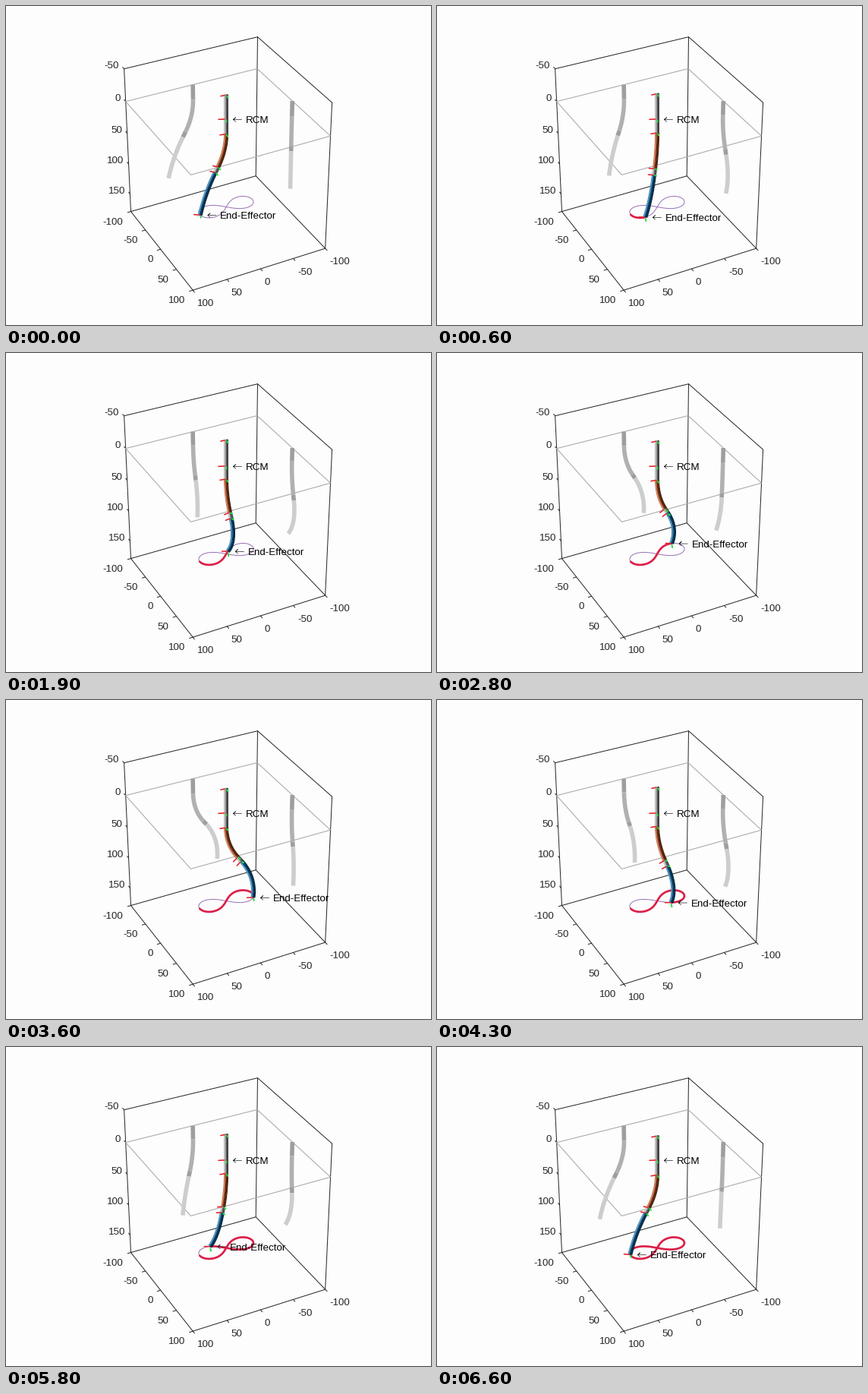
Recreate the animation shown at these times as a matplotlib script. Size 560 by 420 pixels, loop 6700 ms.

```python
import numpy as np
import matplotlib.pyplot as plt
from matplotlib.animation import FuncAnimation

W, H, DPI = 560, 420, 100
FRAMES, STEP = 67, 100
PX = 72 / DPI
ZTOP, ZBOT, ZTIP = -50, 180, 141.7
SIZE = 40.4  # half length of the figure eight
LEAD = 0.3   # phase lead of the arm, in steps
DOWN = np.array([0.0, 0.0, 1.0])

INK = "#262626"
GREY, ORANGE, BLUE = (0.8, 0.8, 0.8), (0.85, 0.33, 0.1), (0.0, 0.447, 0.741)

plt.rcParams["font.family"] = "Liberation Sans"
fig = plt.figure(figsize=(W / DPI, H / DPI), dpi=DPI, facecolor="#fdfdfd")
ax = fig.add_axes([0, 0, 1, 1])
ax.set_xlim(0, W)
ax.set_ylim(H, 0)
ax.axis("off")


def fit_camera():
    """Perspective camera fitted to the visible corners of the box."""
    corners = [
        (-100, 100, ZTOP, 155.5, 82.5), (-100, -100, ZTOP, 331.5, 41),
        (100, -100, ZTOP, 429.5, 126.5),
        (-100, 100, 0, 157.5, 126), (-100, -100, 0, 331, 82.5),
        (100, -100, 0, 427.5, 171.5), (100, 100, 0, 244, 222.5),
        (-100, 100, ZBOT, 164.5, 270.5), (-100, -100, ZBOT, 329.5, 223.5),
        (100, -100, ZBOT, 420.5, 319.5), (100, 100, ZBOT, 246, 374),
    ]
    rows, rhs = [], []
    for x, y, z, u, v in corners:
        p = [x / 100, y / 100, z / 100]
        rows.append(p + [1, 0, 0, 0, 0] + [-u * c for c in p])
        rows.append([0, 0, 0, 0] + p + [1] + [-v * c for c in p])
        rhs += [u, v]
    m = np.linalg.lstsq(np.array(rows), np.array(rhs), rcond=None)[0]
    return np.append(m, 1).reshape(3, 4)


CAMERA = fit_camera()


def project(points):
    p = np.atleast_2d(np.asarray(points, float)) / 100
    h = np.c_[p, np.ones(len(p))] @ CAMERA.T
    return h[:, :2] / h[:, 2:]


def line(points=None, color=INK, width=1.0, z=1, cap="round"):
    xy = np.empty((0, 2)) if points is None else project(points)
    return ax.plot(xy[:, 0], xy[:, 1], color=color, lw=width * PX, zorder=z,
                   solid_capstyle=cap, solid_joinstyle="round")[0]


def label(x, y, text, align="left", color=INK, z=8):
    return ax.text(x, y + 4.7, text, size=13.33 * PX, color=color,
                   ha=align, va="baseline", zorder=z)


def unit(v):
    return v / np.linalg.norm(v)


# ---- box, ticks and labels ----
def box():
    back, left, right, front = (-100, -100), (-100, 100), (100, -100), (100, 100)
    line([left + (ZTOP,), back + (ZTOP,), right + (ZTOP,)])
    line([left + (ZBOT,), back + (ZBOT,), right + (ZBOT,),
          front + (ZBOT,), left + (ZBOT,)])
    for c in (left, back, right):
        line([c + (ZTOP,), c + (ZBOT,)])
    line([c + (0,) for c in (left, back, right, front, left)], "#ababab", 1.1, 2)

    for v in range(-100, 101, 50):
        p = (v, 100, ZBOT)
        line([p, (v, 105, ZBOT)])
        x, y = project(p)[0]
        label(x - 10, y + 12.5, str(v), "right")

        p = (100, v, ZBOT)
        line([p, (105, v, ZBOT)])
        x, y = project(p)[0]
        label(x + 5.5, y + 16.5, str(v))

    for v in range(-50, 151, 50):
        p = (-100, 100, v)
        line([p, (-105, 100, v)])
        x, y = project(p)[0]
        label(x - 6.5, y - 5.5, str(v), "right")


# ---- motion ----
def eight(t):
    s, c = np.sin(t), np.cos(t)
    d = 1 + s * s
    return np.stack([SIZE * s * c / d, SIZE * c / d, ZTIP + 0 * s], axis=-1)


def bend(p, d, q, n=24):
    """Arc from p with direction d to q; returns its points and end direction."""
    chord = q - p
    c = unit(chord)
    e = unit(2 * (d @ c) * c - d)
    reach = np.linalg.norm(chord) * 2 / (1 + d @ c)
    s = np.linspace(0, 1, n)[:, None]
    pts = ((2 * s**3 - 3 * s**2 + 1) * p + (s**3 - 2 * s**2 + s) * reach * d
           + (3 * s**2 - 2 * s**3) * q + (s**3 - s**2) * reach * e)
    return pts, e


def pose(t):
    """Shaft, lower bend, coupling and upper bend, plus the two directions."""
    tip = eight(t)
    q = (tip[1] / SIZE) ** 2
    top = np.array([0, 0, -39.5 + 3 * q])
    base = np.array([0, 0, 21 + 3 * q])
    elbow = np.array([0.85 * (9 * (1 - q) + 0.35 * tip[0]),
                      0.85 * (0.43 * tip[1] - 0.8 - 1.8 * q),
                      71 + 1.5 * q])
    first, d1 = bend(base, DOWN, elbow)
    wrist = elbow + 8.5 * d1
    second, d2 = bend(wrist, d1, tip)
    return [np.array([top, base]), first, np.array([elbow, wrist]), second], d1, d2


# ---- moving parts ----
class Tube:
    """A lit tube built from thin strips side by side."""
    OFFSETS = np.linspace(-2.4, 2.4, 7)
    SHADE = (0.75, 0.95, 0.75, 0.55, 0.4, 0.3, 0.34)
    SHINE = (0.25, 0.4, 0.1, 0, 0, 0, 0)

    def __init__(self, color):
        base = np.array(color)
        self.strips = [line(None, tuple(base * k + w * (1 - base * k)), 1.2, 5, "butt")
                       for k, w in zip(self.SHADE, self.SHINE)]

    def set(self, pts):
        xy = project(pts)
        d = np.gradient(xy, axis=0)
        d /= np.hypot(d[:, 0], d[:, 1])[:, None]
        side = np.c_[d[:, 1], -d[:, 0]]
        for strip, o in zip(self.strips, self.OFFSETS):
            strip.set_data(*(xy + o * side).T)


class Triad:
    def __init__(self):
        self.red = line(None, "#e8202a", 1.6, 6)
        self.green = line(None, "#22e040", 2.0, 6)

    def set(self, p, d, size=8.5, lean=0.0):
        r = np.array([-lean, 1.0, 0.0])
        r = unit(r - (r @ d) * d)
        g = np.cross(r, d)
        self.red.set_data(*project([p + 2 * r, p + size * r]).T)
        self.green.set_data(*project([p + 3 * g, p + 7 * g]).T)


class Pointer:
    """A left arrow followed by a caption."""
    def __init__(self, text):
        self.arrow = ax.plot([], [], color="#202020", lw=0.7 * PX, zorder=8)[0]
        self.text = label(0, 0, text, color="black")

    def set(self, x, y):
        x0 = x + 9.2
        self.arrow.set_data([x0 + 11, x0, x0 + 3, x0, x0 + 3],
                            [y, y, y - 2.7, y, y + 2.7])
        self.text.set_position((x + 25.5, y + 4.7))


box()
line(eight(np.linspace(0, 2 * np.pi, 240)), "#9a72b8", 1.0, 3)
trace = line(None, "#dc1f47", 2.7, 4)
tubes = [Tube(c) for c in (GREY, ORANGE, GREY, BLUE)]
SHADOWS = ("#9e9e9e", "#b0b0b0", "#9e9e9e", "#cdcdcd")
walls = [[line(None, c, 5.6, 2.5, "butt") for c in SHADOWS] for _ in range(2)]
triads = [Triad() for _ in range(6)]
rcm, effector = Pointer("RCM"), Pointer("End-Effector")
rcm.set(*(project((0, 0, 0))[0] + (0.3, 1.5)))


def draw(i):
    t = 2 * np.pi * (i + LEAD) / FRAMES
    parts, d1, d2 = pose(t)

    for tube, pts in zip(tubes, parts):
        tube.set(pts)

    for axis, shadow in enumerate(walls):
        for k, (art, pts) in enumerate(zip(shadow, parts)):
            flat = pts.copy()
            flat[:, axis] = -100
            if k == 0:
                flat[0, 2] = 0
            art.set_data(*project(flat).T)

    spots = [(parts[0][0] + DOWN, DOWN, 7.5, 0.1), (DOWN, DOWN, 10, 0.4),
             (parts[0][1], DOWN, 8.5, 0.15), (parts[2][0], d1),
             (parts[2][1], d1), (parts[3][-1], d2, 8.5, 0.3)]
    for triad, spot in zip(triads, spots):
        triad.set(*spot)

    trace.set_data(*project(eight(np.linspace(0, t, 3 * i + 2))).T)
    effector.set(*(project(parts[3][-1])[0] + (0.9, 0.4)))
    return []


anim = FuncAnimation(fig, draw, frames=FRAMES, interval=STEP,
                     repeat=True, repeat_delay=0, blit=False)
plt.show()
```
